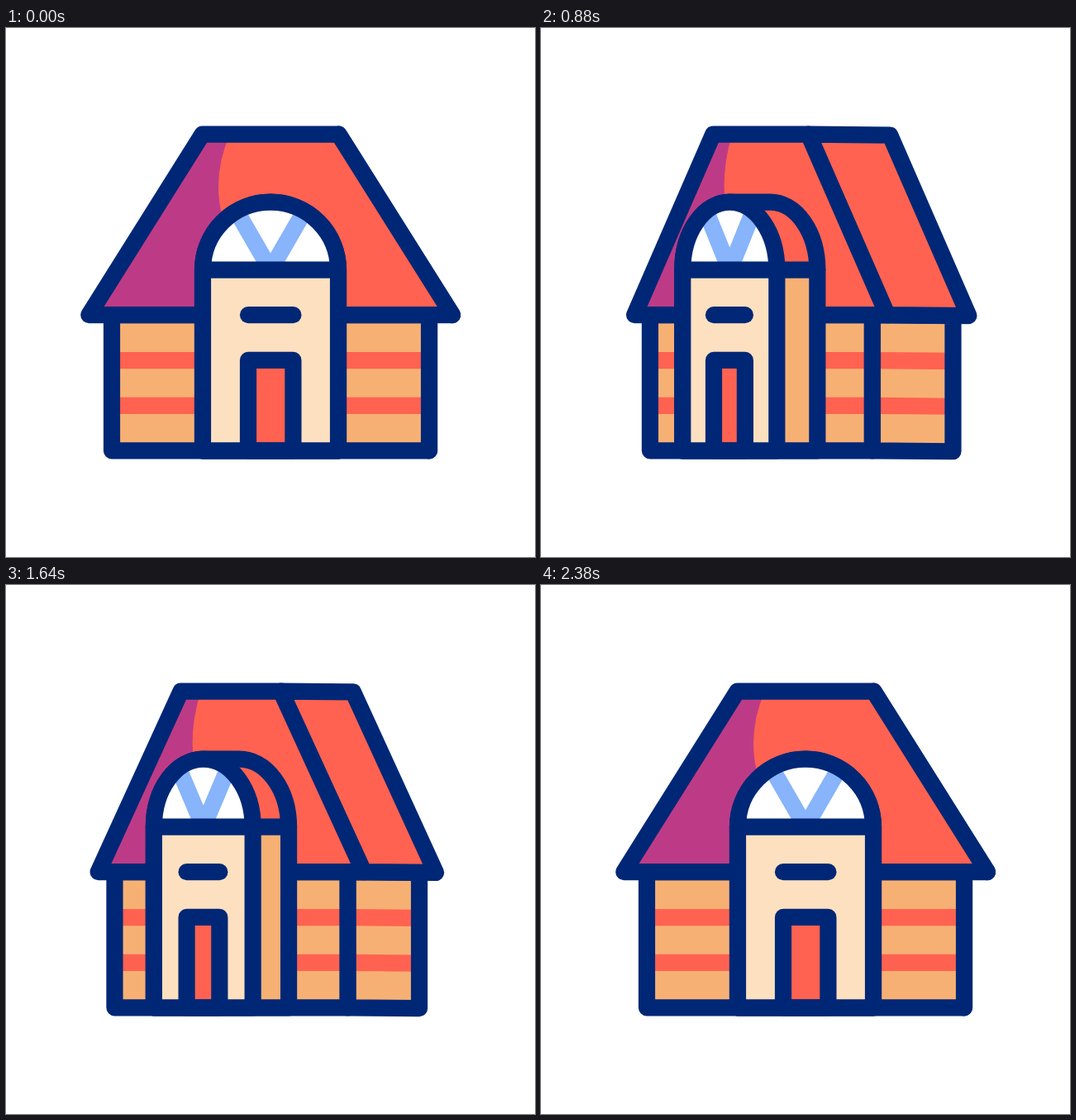
Write an HTML page with a canvas that moves like this. It is 640 by 640 pixels and loops after 2400 ms.

```html
<!DOCTYPE html>
<html lang="en">
<head>
<meta charset="utf-8">
<title>Turning house</title>
<style>
  html, body { margin: 0; width: 100%; height: 100%; overflow: hidden; background: #fff; }
  canvas { display: block; width: 640px; height: 640px; }
</style>
</head>
<body>
<canvas id="stage" width="640" height="640"></canvas>
<script>
const ctx = document.getElementById('stage').getContext('2d');
const LOOP = 2400, TURN_END = 1200, RETURN_END = 2380;
const EASE_X = 0.73;
const NAVY = '#002776', RED = '#ff6250', PURPLE = '#bd3b86';
const PEACH = '#fde0bf', ORANGE = '#f7b074', BLUE = '#87b4fa';
const ROOF_TOP = 128.7, EAVES = 347.2, GROUND = 511.4, SPRING = 292.6, ARCH_H = 82;

// Symmetric cubic Bezier ease (EASE_X, 0, 1 - EASE_X, 1), solved by bisection.
function ease(x) {
  let lo = 0, hi = 1;
  for (let i = 0; i < 30; i++) {
    const s = (lo + hi) / 2, r = 1 - s;
    const bx = 3 * r * r * s * EASE_X + 3 * r * s * s * (1 - EASE_X) + s * s * s;
    if (bx < x) lo = s; else hi = s;
  }
  return lo * lo * (3 - 2 * lo);
}

function turnAt(t) {
  if (t < TURN_END) return ease(t / TURN_END);
  return 1 - ease(Math.min(1, (t - TURN_END) / (RETURN_END - TURN_END)));
}

function polygon(...points) {
  const path = new Path2D();
  points.forEach(([x, y]) => path.lineTo(x, y));
  path.closePath();
  return path;
}

function polyline(...points) {
  const path = new Path2D();
  points.forEach(([x, y]) => path.lineTo(x, y));
  return path;
}

function fill(path, color) {
  ctx.fillStyle = color;
  ctx.fill(path);
}

function stroke(path, color = NAVY) {
  ctx.strokeStyle = color;
  ctx.stroke(path);
}

function clipped(path, draw) {
  ctx.save();
  ctx.clip(path);
  draw();
  ctx.restore();
}

function wall(left, right, dropLeft, dropRight) {
  const band = (top, bottom) => polygon(
    [left, top + dropLeft], [right, top + dropRight],
    [right, bottom + dropRight], [left, bottom + dropLeft]);
  const outline = band(EAVES, GROUND);
  fill(outline, ORANGE);
  fill(band(392, 412.3), RED);
  fill(band(446.8, 467), RED);
  stroke(outline);
}

function drawWalls(mix, drop) {
  const corner = mix(512, 392.8);
  wall(corner, mix(512, 497.5), 0, drop);
  wall(mix(128, 132.2), corner, 0, 0);
}

function drawRoof(mix, drop) {
  const topLeft = [mix(237.5, 206), ROOF_TOP];
  const topMid = [mix(402.5, 318), ROOF_TOP];
  const topRight = [mix(402.5, 423.6), ROOF_TOP + drop];
  const lowLeft = [mix(100.3, 114), EAVES];
  const lowMid = [mix(540, 410.3), EAVES];
  const lowRight = [mix(540, 515.8), EAVES + drop];

  const side = polygon(topMid, topRight, lowRight, lowMid);
  fill(side, RED);
  stroke(side);

  const front = polygon(topLeft, topMid, lowMid, lowLeft);
  fill(front, RED);
  clipped(front, () => {
    const shade = new Path2D();
    shade.moveTo(0, 128);
    shade.lineTo(mix(271, 228.5), 128);
    shade.quadraticCurveTo(mix(223, 196), 237.5, mix(340, 275), EAVES);
    shade.lineTo(0, EAVES);
    fill(shade, PURPLE);
  });
  stroke(front);
}

function archway(left, right) {
  const path = new Path2D();
  path.moveTo(left, GROUND);
  path.lineTo(left, SPRING);
  path.ellipse((left + right) / 2, SPRING, (right - left) / 2, ARCH_H, 0, Math.PI, 2 * Math.PI);
  path.lineTo(right, GROUND);
  path.closePath();
  return path;
}

function drawPorch(mix) {
  const left = mix(238, 166.5), right = mix(402, 277), back = mix(402, 329.5);
  const mid = (left + right) / 2, radius = (right - left) / 2;
  const below = [left, SPRING, back - left, GROUND - SPRING];

  const body = new Path2D();
  body.moveTo(left, GROUND);
  body.lineTo(left, SPRING);
  body.ellipse(mid, SPRING, radius, ARCH_H, 0, Math.PI, 1.5 * Math.PI);
  body.ellipse(back - radius, SPRING, radius, ARCH_H, 0, 1.5 * Math.PI, 2 * Math.PI);
  body.lineTo(back, GROUND);
  body.closePath();
  fill(body, RED);
  ctx.fillStyle = ORANGE;
  ctx.fillRect(...below);
  stroke(body);

  const front = archway(left, right);
  fill(front, '#fff');
  clipped(front, () => {
    const spread = radius * 1.156;
    ctx.lineJoin = 'miter';
    stroke(polyline([mid - spread, SPRING - 2 * ARCH_H], [mid, SPRING], [mid + spread, SPRING - 2 * ARCH_H]), BLUE);
  });
  ctx.fillStyle = PEACH;
  ctx.fillRect(left, SPRING, right - left, GROUND - SPRING);
  stroke(polyline([left, SPRING], [back, SPRING]));

  const doorLeft = mix(293, 203), doorRight = mix(347.4, 239.7);
  const door = polygon([doorLeft, GROUND], [doorLeft, 401.9], [doorRight, 401.9], [doorRight, GROUND]);
  fill(door, RED);
  stroke(door);
  stroke(polyline([doorLeft, EAVES], [doorRight, EAVES]));
  stroke(front);
}

function frame(now) {
  const turn = turnAt(now % LOOP);
  const mix = (a, b) => a + (b - a) * turn;
  const drop = mix(0, 0.9);
  ctx.fillStyle = '#fff';
  ctx.fillRect(0, 0, 640, 640);
  ctx.lineWidth = 20.2;
  ctx.lineCap = ctx.lineJoin = 'round';
  drawWalls(mix, drop);
  drawRoof(mix, drop);
  drawPorch(mix);
}

const start = performance.now();
function tick() {
  frame(performance.now() - start);
  requestAnimationFrame(tick);
}
tick();
</script>
</body>
</html>
```
